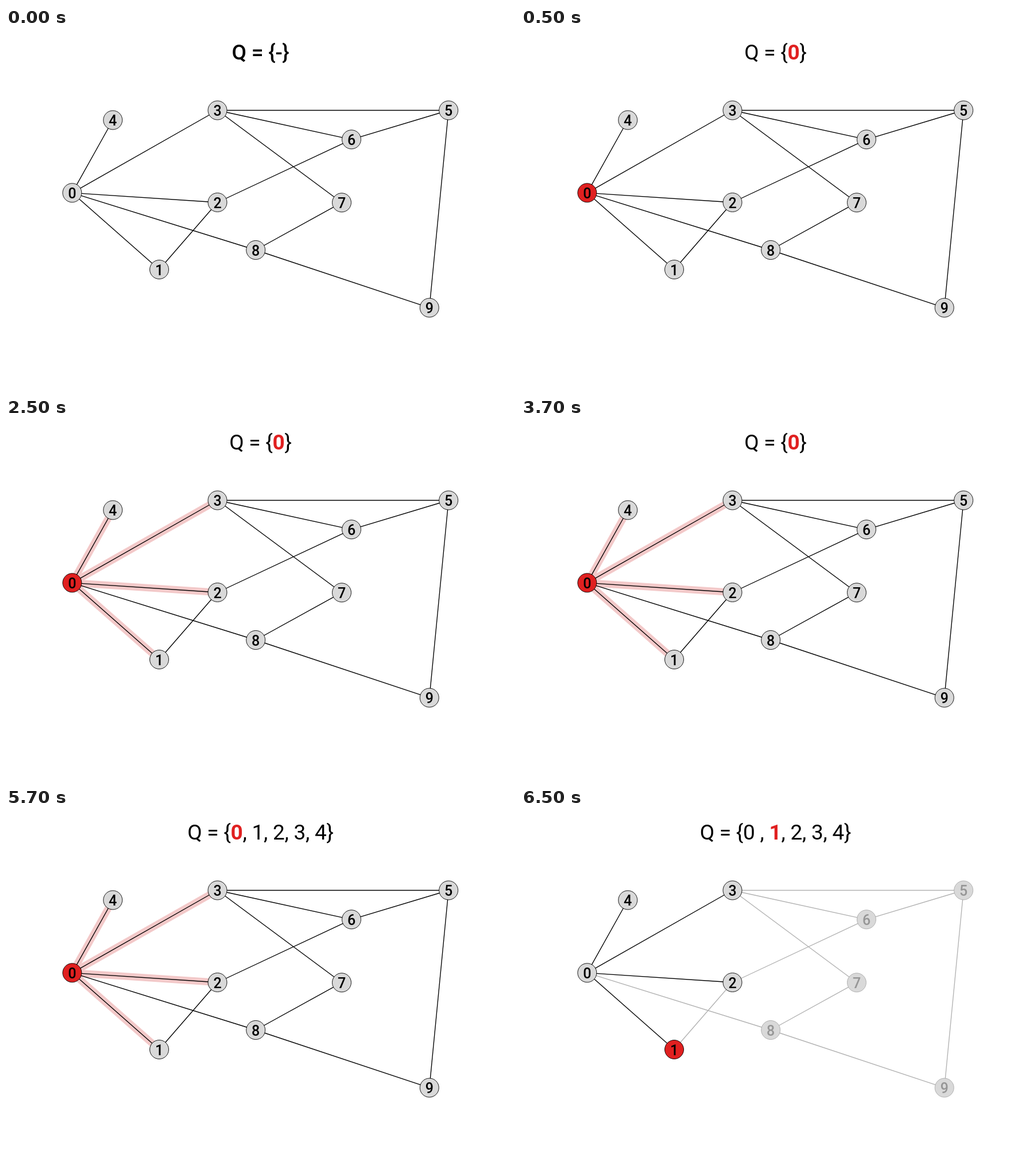
Write an HTML page with a canvas that moves like this. It is 887 px wide and 631 px high and loops after 8000 ms.

```html
<!DOCTYPE html>
<html lang="en">
<head>
<meta charset="utf-8">
<title>Breadth-first search</title>
<style>
  html, body { margin: 0; width: 100%; height: 100%; overflow: hidden; background: #fff; }
  canvas { display: block; }
</style>
</head>
<body>
<canvas id="stage" width="887" height="631"></canvas>
<script>
const stage = document.getElementById('stage');
const ctx = stage.getContext('2d');
const LOOP = 8000;
const RED = '#e02020';
const FONT = 'Roboto, "Open Sans", sans-serif';

const nodes = [
  [115.3, 287.3], [267, 421], [368.5, 304], [368.5, 143.5], [186.2, 160.5],
  [771.2, 143.5], [602, 194.3], [585, 304.3], [435.2, 387], [737.8, 487.6]
];
const tree = ['01', '02', '03', '04'];
const edges = ['08', '12', '26', '35', '36', '37', '56', '59', '78', '89', ...tree];

// Asterisks in the queue text enclose the current node.
const steps = [
  { at: 0, queue: 'Q = {-}', weight: 500 },
  { at: 500, queue: 'Q = {*0*}', current: 0 },
  { at: 2500, queue: 'Q = {*0*}', current: 0, glow: true },
  { at: 4500, queue: 'Q = {*0*, 1, 2, 3, 4}', current: 0, glow: true },
  { at: 6500, queue: 'Q = {0 , *1*, 2, 3, 4}', current: 1, faded: true }
];

function drawEdge([a, b], color, width) {
  ctx.strokeStyle = color;
  ctx.lineWidth = width;
  ctx.beginPath();
  ctx.moveTo(...nodes[a]);
  ctx.lineTo(...nodes[b]);
  ctx.stroke();
}

function drawNode(i, current, dim) {
  const [x, y] = nodes[i];
  ctx.beginPath();
  ctx.arc(x, y, 16.5, 0, Math.PI * 2);
  ctx.fillStyle = i === current ? RED : '#d9d9d9';
  ctx.fill();
  ctx.strokeStyle = dim ? '#aaa' : '#000';
  ctx.lineWidth = 0.9;
  ctx.stroke();
  ctx.font = `500 25px ${FONT}`;
  ctx.letterSpacing = '0px';
  ctx.textAlign = 'center';
  ctx.fillStyle = dim ? '#969696' : '#000';
  ctx.fillText(i, x, y + 9.5);
}

function drawQueue({ queue, weight = 400 }) {
  ctx.textAlign = 'left';
  ctx.letterSpacing = '-0.25px';
  const runs = queue.split('*').map((text, i) => {
    const hot = i % 2 === 1;
    const font = `${hot ? 700 : weight} 37px ${FONT}`;
    ctx.font = font;
    return { text, font, color: hot ? RED : '#000', width: ctx.measureText(text).width };
  });
  let x = (stage.width - runs.reduce((sum, run) => sum + run.width, 0)) / 2;
  for (const run of runs) {
    ctx.font = run.font;
    ctx.fillStyle = run.color;
    ctx.fillText(run.text, x, 55);
    x += run.width;
  }
}

function draw(step) {
  ctx.fillStyle = '#fff';
  ctx.fillRect(0, 0, stage.width, stage.height);
  if (step.glow) tree.forEach(e => drawEdge(e, '#f3c9c9', 12.5));
  edges.forEach(e => {
    const dim = step.faded && !tree.includes(e);
    drawEdge(e, dim ? '#b2b2b2' : '#000', 1.35);
  });
  nodes.forEach((_, i) => drawNode(i, step.current, step.faded && i > 4));
  drawQueue(step);
}

function frame() {
  const t = performance.now() % LOOP;
  draw(steps.findLast(s => s.at <= t));
  requestAnimationFrame(frame);
}
frame();
</script>
</body>
</html>
```
